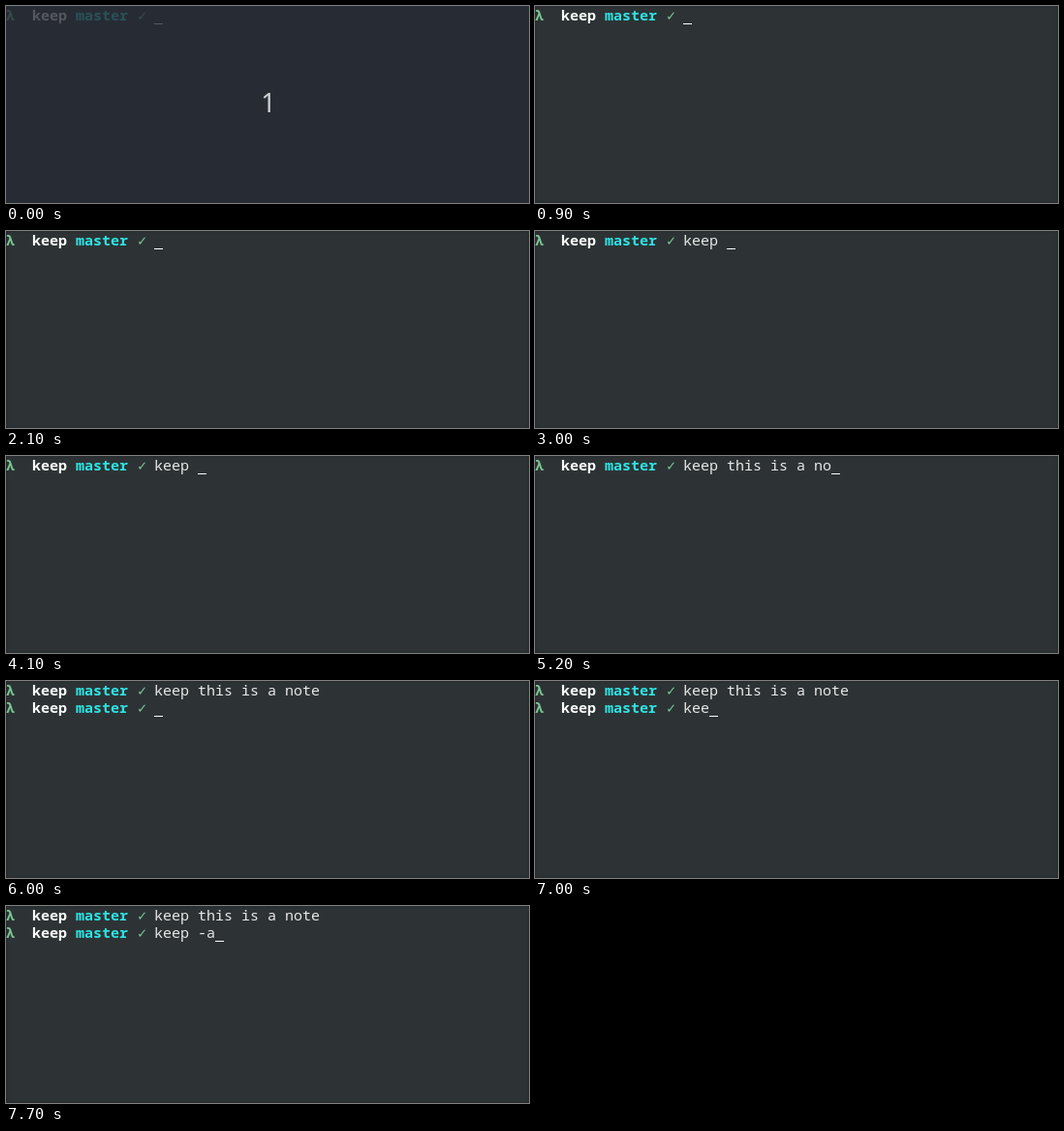
An HTML page that plays this animation: 540 by 204 pixels, repeating every 8000 ms.

```html
<!DOCTYPE html>
<html lang="en">
<head>
<meta charset="utf-8">
<title>Terminal</title>
<style>
  html, body { margin: 0; width: 100%; height: 100%; overflow: hidden; background: #2d3335; }
  svg { display: block; width: 540px; height: 204px; box-shadow: inset 0 0 3px rgba(0, 0, 0, .35); }
  text { font: 15px "Noto Sans Mono", monospace; white-space: pre; fill: #e8e8e8; }
  .bold { font-weight: 700; fill: #fff; }
  .branch { font-weight: 700; fill: #2fe3e3; }
  .lambda { font-weight: 700; fill: #7bc795; }
  .check { font-family: "DejaVu Sans Mono", monospace; fill: #7bc795; }
  #count { font: 27px "Noto Sans", sans-serif; fill: #d0d1d3; text-anchor: middle; }
</style>
</head>
<body>
<svg viewBox="0 0 540 204">
  <defs>
    <g id="prompt">
      <text class="lambda" x="0" y="15">λ</text>
      <text class="bold" x="27" y="15">keep</text>
      <text class="branch" x="72" y="15">master</text>
      <text class="check" x="136" y="15">✓</text>
    </g>
  </defs>
  <use href="#prompt"/>
  <text id="first" x="153" y="15"></text>
  <use id="prompt2" href="#prompt" y="18"/>
  <text id="second" x="153" y="33"></text>
  <rect id="cursor" width="9" height="1" fill="#fff"/>
  <g id="overlay">
    <rect width="540" height="204" fill="#272b34" fill-opacity=".79"/>
    <text id="count" x="271" y="110">1</text>
  </g>
</svg>
<script>
const DURATION = 8000, CELL = 9, ROW = 18, INPUT_X = 153, BLINK = 600;
const OVERLAY_END = 300, FIRST_KEY = 2600, NEWLINE = 5900, NEW_PROMPT = 6000;

const $ = id => document.getElementById(id);
const show = (id, visible) => $(id).setAttribute("visibility", visible ? "visible" : "hidden");

// Types text at a steady rate; the first `lead` characters appear at once.
function burst(t, text, start, end, lead) {
  if (t < start) return "";
  return text.slice(0, Math.floor(lead + (text.length - lead) * (t - start) / (end - start)));
}

const firstLine = t =>
  burst(t, "keep ", FIRST_KEY, 3000, 2) +
  burst(t, "this is a ", 4300, 5000, 2) +
  burst(t, "note", 5200, 5500, 2);

const secondLine = t =>
  burst(t, "keep", 6800, 7100, 1) +
  burst(t, " -a", 7500, 7700, 1);

// Blinks until typing starts, then flickers once during the pause after the first word.
function cursorVisible(t) {
  if (t < FIRST_KEY) return (t + BLINK - OVERLAY_END) % (2 * BLINK) < BLINK;
  return t < 4000 || t >= 4100;
}

function render(t) {
  const first = firstLine(t), second = secondLine(t);
  const onSecond = t >= NEWLINE, prompted = t >= NEW_PROMPT;
  $("first").textContent = first;
  $("second").textContent = second;
  show("prompt2", prompted);
  show("overlay", t < OVERLAY_END);
  show("cursor", cursorVisible(t));
  const x = onSecond && !prompted ? 0 : INPUT_X + CELL * (onSecond ? second : first).length;
  $("cursor").setAttribute("x", x);
  $("cursor").setAttribute("y", onSecond ? 2 * ROW : ROW);
}

function tick() {
  render(performance.now() % DURATION);
  requestAnimationFrame(tick);
}
tick();
</script>
</body>
</html>
```
